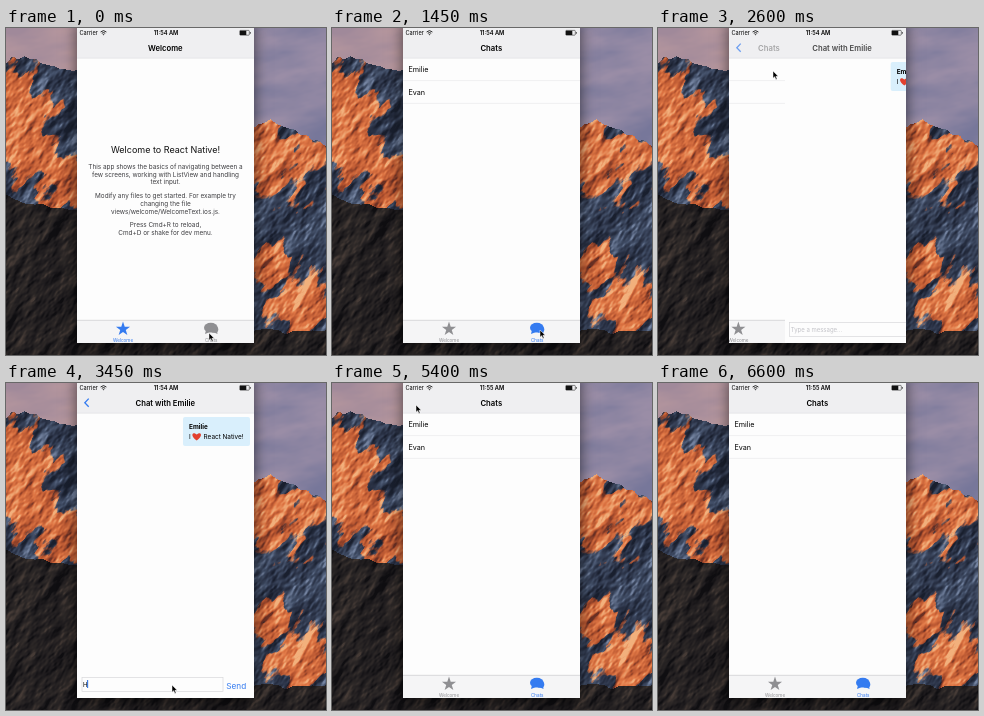
Animation, 320 px wide and 327 px high, one loop 6.65 s. Source, as an HTML page with a canvas:

```html
<!DOCTYPE html>
<html lang="en">
<head>
<meta charset="utf-8">
<title>Chat demo</title>
<style>
  html, body { margin: 0; width: 100%; height: 100%; overflow: hidden; background: #1c1c23; }
  canvas, svg { position: absolute; left: 0; top: 0; width: 320px; height: 327px; }
  svg { font: 6.4px Inter, "Open Sans", sans-serif; }
  .mid { text-anchor: middle; }
  .title { font-size: 7.7px; font-weight: 600; text-anchor: middle; }
  .status { font-size: 5.6px; }
  .clock { font-size: 5.7px; font-weight: 600; text-anchor: middle; }
  .row { font-size: 7.2px; }
  .tab { font-size: 4.6px; text-anchor: middle; }
  .bold { font-weight: 700; }
  .blue { fill: #347bf0; }
  .gray { fill: #8f8f92; }
  .line { stroke: #e6e6e8; stroke-width: .6; }

  .hard, .slide { animation: 6650ms infinite; }
  .hard { animation-timing-function: step-end; }
  .slide { animation-timing-function: cubic-bezier(.25, .75, .25, 1); }
  .welcome { animation-name: welcome; }
  .chats { animation-name: chats; }
  .early { animation-name: early; }
  .late { animation-name: late; }
  .sent { animation-name: sent; }
  .under { animation-name: under; }
  .over { animation-name: over; }
  .list-title { animation-name: list-title; }
  .chat-title { animation-name: chat-title; }
  .back { animation-name: back; }
  .cursor { animation: cursor 6650ms ease-in-out infinite; }

  @keyframes welcome { 0% { visibility: visible } 3% { visibility: hidden } }
  @keyframes chats { 0% { visibility: hidden } 3% { visibility: visible } }
  @keyframes early { 0% { visibility: visible } 61% { visibility: hidden } }
  @keyframes late { 0% { visibility: hidden } 61% { visibility: visible } }
  @keyframes sent { 0% { visibility: hidden } 66.2% { visibility: visible } }
  @keyframes under {
    0%, 37.6%, 80%, 100% { transform: none }
    43.6%, 74.9% { transform: translateX(-53px) }
  }
  @keyframes over {
    0%, 37.6%, 80%, 100% { transform: translateX(180px) }
    43.6%, 74.9% { transform: none }
  }
  @keyframes list-title {
    0%, 37.6%, 80%, 100% { transform: none; opacity: 1 }
    43.6%, 74.9% { transform: translateX(-70px); opacity: 0 }
  }
  @keyframes chat-title {
    0%, 37.6%, 80%, 100% { transform: translateX(80px); opacity: 0 }
    43.6%, 74.9% { transform: none; opacity: 1 }
  }
  @keyframes back {
    0%, 37.6%, 80%, 100% { opacity: 0 }
    43.6%, 74.9% { opacity: 1 }
  }
  @keyframes cursor {
    0%, 3% { transform: translate(203px, 305px) }
    8%, 25% { transform: translate(208px, 302px) }
    30.1% { transform: translate(211px, 303px) }
    36%, 40% { transform: translate(115px, 43px) }
    48.2%, 61.7% { transform: translate(166px, 302px) }
    65.4%, 69.9% { transform: translate(236px, 306px) }
    74.1%, 84.2% { transform: translate(84px, 22px) }
    90.2%, 100% { transform: translate(84px, -14px) }
  }
</style>
</head>
<body>
<canvas id="scene" width="320" height="327"></canvas>
<svg viewBox="0 0 320 327">
  <defs>
    <clipPath id="screen"><rect x="71" width="177" height="315"/></clipPath>
    <polygon id="star"/>
    <g id="bubble">
      <ellipse cx="204.8" cy="299.7" rx="6.8" ry="4.9"/>
      <ellipse cx="208.3" cy="301.4" rx="4" ry="3.4"/>
      <path d="M200 302L199 306L204 304ZM207 304L211.5 306L211 302Z"/>
    </g>
  </defs>

  <g clip-path="url(#screen)">
    <rect x="71" width="177" height="315" fill="#fdfdfd"/>

    <g class="slide under">
      <g id="intro" class="hard welcome mid" fill="#3f3f42">
        <text x="159.5" y="124.5" font-size="9" fill="#111">Welcome to React Native!</text>
      </g>
      <g class="hard chats">
        <text class="row" x="76.5" y="44.3">Emilie</text>
        <text class="row" x="76.5" y="67">Evan</text>
        <path class="line" d="M71 52.6H248M71 75.4H248"/>
      </g>
      <rect x="71" y="292" width="177" height="23" fill="#f5f5f6"/>
      <path stroke="#c4c4c6" stroke-width=".6" d="M71 292.3H248"/>
      <g class="hard welcome">
        <g class="blue"><use href="#star"/><text class="tab" x="117" y="313.6">Welcome</text></g>
        <g class="gray"><use href="#bubble"/><text class="tab" x="205.3" y="313.6">Chats</text></g>
      </g>
      <g class="hard chats">
        <g class="gray"><use href="#star"/><text class="tab" x="117" y="313.6">Welcome</text></g>
        <g class="blue"><use href="#bubble"/><text class="tab" x="205.3" y="313.6">Chats</text></g>
      </g>
    </g>

    <g class="slide over">
      <rect x="71" y="30" width="177" height="285" fill="#fdfdfd"/>
      <rect x="177" y="34" width="67" height="29" rx="2" fill="#d9effc"/>
      <text class="bold" x="183" y="46">Emilie</text>
      <text x="183" y="55.9">I</text>
      <path fill="#e2402f" d="M190.7 57.6C184 53 186 47.5 190.7 51.6C195.4 47.5 197.4 53 190.7 57.6Z"/>
      <text x="197.6" y="55.9">React Native!</text>
      <g class="hard sent">
        <rect x="209" y="65" width="35" height="28" rx="2" fill="#d9effc"/>
        <text class="bold" x="215" y="77">Me</text>
        <text x="215" y="85.6">Hi Evan</text>
      </g>
      <rect id="field" x="76" y="294.5" width="164" height="14" fill="none" stroke="#d3d3d6" stroke-width=".6"/>
      <text id="hint" x="77" y="303.6" font-size="6" fill="#c3c3c8">Type a message...</text>
      <text id="typed" x="77" y="303.6" font-size="6"></text>
      <rect id="caret" x="76.5" y="297" width="1.2" height="8" fill="#3f7be0"/>
      <text id="send" class="blue" x="220.3" y="305.8" font-size="8.2">Send</text>
    </g>

    <rect x="71" width="177" height="30" fill="#efeff1"/>
    <path stroke="#dcdcdf" stroke-width=".6" d="M71 30.2H248"/>
    <text class="title hard welcome" x="159.3" y="22.8">Welcome</text>
    <g class="slide list-title"><text class="title hard chats" x="159.3" y="22.8">Chats</text></g>
    <text class="title slide chat-title" x="159.3" y="22.8">Chat with Emilie</text>
    <path class="slide back" d="M82.7 15.6L78.8 19.7L82.7 23.8" fill="none" stroke="#347bf0" stroke-width="1.3"/>

    <text class="status" x="73.5" y="6.8">Carrier</text>
    <g fill="none" stroke="#111" stroke-width=".9">
      <path d="M94.6 4Q97.5 1.2 100.4 4M95.8 5.3Q97.5 3.8 99.2 5.3"/>
      <circle cx="97.5" cy="6.6" r=".3"/>
    </g>
    <text class="clock hard early" x="160" y="6.8">11:54 AM</text>
    <text class="clock hard late" x="160" y="6.8">11:55 AM</text>
    <rect x="233.7" y="2.4" width="9.6" height="4.8" rx=".8" fill="none" stroke="#111" stroke-width=".5"/>
    <path d="M234 2.7H240.3V6.9H234ZM243.9 4H244.6V5.7H243.9Z" fill="#111"/>
  </g>

  <path class="cursor" d="M0 0V7.2L1.7 5.7L2.9 8.4L4.1 7.9L2.9 5.3H5.2Z" stroke="#fff" stroke-width=".5"/>
</svg>

<script>
  const LOOP = 6650, MESSAGE = "Hi Evan";
  const FOCUS = 3250, TYPE = 3400, KEY_GAP = 105, SEND = 4400;
  const INTRO = [
    ["This app shows the basics of navigating between a", "few screens, working with ListView and handling", "text input."],
    ["Modify any files to get started. For example try", "changing the file", "views/welcome/WelcomeText.ios.js."],
    ["Press Cmd+R to reload,", "Cmd+D or shake for dev menu."],
  ];
  const $ = id => document.getElementById(id);
  const clamp = v => Math.min(1, Math.max(0, v));
  const mix = (a, b, k) => a + (b - a) * k;

  function layIntro() {
    let y = 140.6;
    for (const paragraph of INTRO) {
      for (const line of paragraph) {
        const text = document.createElementNS("http://www.w3.org/2000/svg", "text");
        text.setAttribute("x", 159.5);
        text.setAttribute("y", y);
        text.textContent = line;
        $("intro").append(text);
        y += 7.9;
      }
      y += 5.6;
    }
  }

  function layStar() {
    const corner = (_, i) => {
      const r = i % 2 ? 2.9 : 7.4, a = i * Math.PI / 5;
      return [117 + r * Math.sin(a), 301 - r * Math.cos(a)];
    };
    $("star").setAttribute("points", Array.from({ length: 10 }, corner).join(" "));
  }

  function hash(i, j) {
    const s = Math.sin(i * 127.1 + j * 311.7) * 43758.5453;
    return s - Math.floor(s);
  }

  function noise(x, y) {
    const i = Math.floor(x), j = Math.floor(y);
    const ease = v => v * v * (3 - 2 * v);
    const u = ease(x - i), v = ease(y - j);
    return mix(mix(hash(i, j), hash(i + 1, j), u), mix(hash(i, j + 1), hash(i + 1, j + 1), u), v);
  }

  function fbm(x, y) {
    let sum = 0;
    for (let a = .5; a > .05; a /= 2, x *= 2.03, y *= 2.03) sum += a * noise(x, y);
    return sum;
  }

  const palette = (...list) => list.map(c => [1, 3, 5].map(i => parseInt(c.slice(i, i + 2), 16)));
  const blend = (a, b, k) => a.map((v, i) => mix(v, b[i], k));
  function ramp(colors, k) {
    const p = clamp(k) * (colors.length - 1), i = Math.min(Math.floor(p), colors.length - 2);
    return blend(colors[i], colors[i + 1], p - i);
  }

  const WARM_SKY = palette("#a0899a", "#c09d9f");
  const COOL_SKY = palette("#77779a", "#9a8da6");
  const SUNLIT = palette("#6a3024", "#b4532f", "#df7644", "#f2b07c");
  const SHADE = palette("#191f2e", "#2b3347", "#435069", "#7483a0");
  const BOULDER = palette("#0f0e11", "#1f1c1e", "#2d2827", "#463b36");

  // Centre and radius of each sunlit patch.
  const SUN = [[4, 85, 42], [24, 126, 30], [60, 158, 28], [264, 130, 38], [304, 122, 24], [268, 238, 22], [292, 276, 28]];

  const height = (x, y) => fbm((x + y * .5) / 20, y / 28);

  function sceneColor(x, y) {
    const left = x < 160;
    const ridge = left ? 27 + .3 * Math.abs(x - 18) : 91 + .5 * Math.abs(x - 264);
    if (y < ridge + 6 * (noise(x / 6, 1) - .5)) {
      return ramp(left ? WARM_SKY : COOL_SKY, 2 * fbm((x + y) / 60, y / 25) - .4);
    }
    const relief = .45 + 6 * (height(x, y) - height(x + 1.5, y + 1));
    const ground = left ? 170 + x * .15 : 302;
    if (y > ground + 8 * (noise(x / 9, 2) - .5)) return ramp(BOULDER, relief);
    const glow = Math.max(...SUN.map(([cx, cy, r]) => 1 - Math.hypot(x - cx, y - cy) / r));
    const light = glow + 2.2 * (fbm((x + y * .6) / 13 + 9, y / 20) - .47);
    return blend(ramp(SHADE, relief), ramp(SUNLIT, relief + .1), clamp(light / .15));
  }

  function paintScene() {
    const ctx = $("scene").getContext("2d");
    const image = ctx.createImageData(320, 327);
    for (let y = 0; y < 327; y++) {
      for (let x = 0; x < 320; x++) {
        if (x > 71 && x < 247 && y < 314) continue;
        image.data.set([...sceneColor(x, y), 255], (y * 320 + x) * 4);
      }
    }
    ctx.putImageData(image, 0, 0);
    ctx.shadowColor = "rgba(0,0,0,.6)";
    ctx.shadowBlur = 14;
    ctx.shadowOffsetY = 5;
    ctx.fillRect(71, -10, 177, 325);
  }

  const show = (id, on) => $(id).style.visibility = on ? "visible" : "hidden";

  function tick() {
    const t = performance.now() % LOOP;
    const count = t < TYPE || t >= SEND ? 0 : 1 + Math.floor((t - TYPE) / KEY_GAP);
    const text = MESSAGE.slice(0, count);
    $("typed").textContent = text;
    const width = text ? $("typed").getComputedTextLength() : 0;
    $("caret").setAttribute("x", 76.5 + width);
    $("field").setAttribute("width", text ? 141 : 164);
    show("caret", t >= FOCUS);
    show("hint", !text);
    show("send", text);
    requestAnimationFrame(tick);
  }

  layIntro();
  layStar();
  paintScene();
  tick();
</script>
</body>
</html>
```
